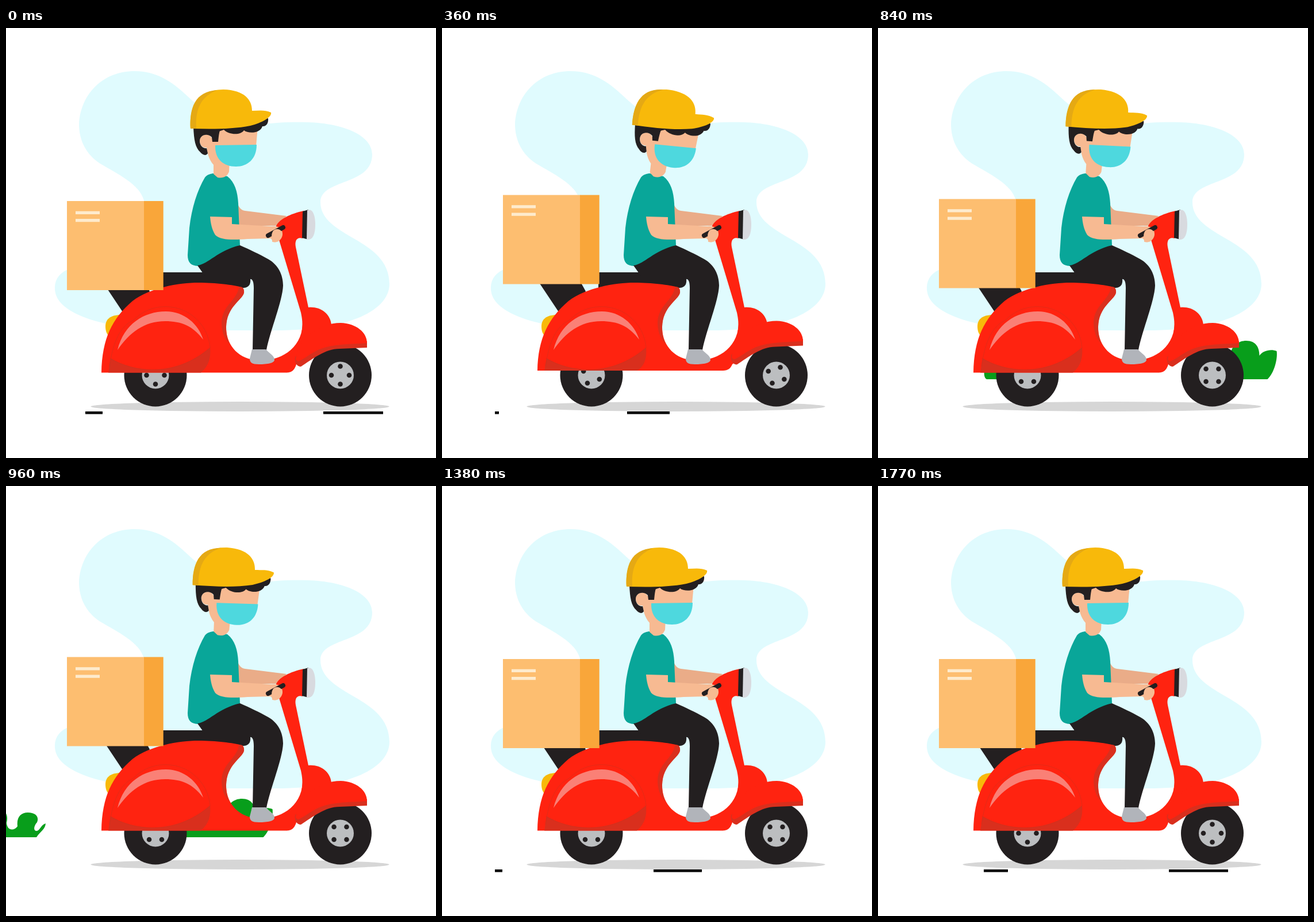
These frames come from a looping animation (748 px wide and 748 px high, 1.8 s). An HTML page with a canvas:

```html
<!DOCTYPE html>
<html lang="en">
<head>
<meta charset="utf-8">
<title>Scooter delivery</title>
<style>
html, body { margin: 0; width: 100%; height: 100%; overflow: hidden; background: #fff; }
canvas { display: block; width: 100vw; height: 100vh; }
</style>
</head>
<body>
<canvas id="stage" width="748" height="748"></canvas>
<script>
const ctx = document.getElementById('stage').getContext('2d');
const STEP = 30, STEPS = 60;

const INK = '#231f20', RED = '#ff2310', DARK_RED = '#d92f1d', SKIN = '#f7ba92',
  FAR_SKIN = '#eaac88', TEAL = '#09a699', YELLOW = '#f8b90a', GREY = '#bcbec0', GREEN = '#089e1b';

const shapes = {
  blob: 'M224 75C260 75 288 92 315 118C350 151 385 173 440 168C470 164 500 163 525 164C590 166 637 188 637 220C637 275 547 262 547 303C547 365 667 365 667 445C667 490 600 526 470 526H300C180 526 85 500 85 453C85 435 95 425 110 419C180 400 245 335 240 300C232 271 194 254 164 236C138 219 127 194 127 167C130 115 168 75 224 75Z',
  bigBush: 'M26 611C16 610 14 592 26 590C38 588 42 588 41 578C36 565 42 553 56 553C68 553 72 560 74 568C76 582 90 583 95 570C97 552 110 544 123 544C140 544 146 556 146 570C152 561 166 558 176 562C178 575 172 600 160 611Z',
  smallBush: 'M641 611C637 609 636 603 637 594C641 601 649 601 653 593C649 576 653 563 666 563C679 563 682 575 679 586C680 599 691 601 698 592C696 576 704 568 716 568C730 568 736 576 732 585C725 593 726 601 732 600C738 598 738 590 747 587C746 598 738 600 731 611Z',
  tail: 'M200 499C180 499 173 508 173 519C173 528 176 534 181 538L205 520Z',
  strut: 'M167 440H240L250 458L225 490L203 494Z',
  seat: 'M272 425H415C425 425 427 440 424 446C420 453 411 453 406 451L340 470H272Z',
  farArm: 'M403 306C406 313 409 317 416 318L488 327L473 344H404Z',
  head: 'M469 347C473 333 495 323 518 318L516 366C506 363 502 370 504 381L526 486C546 484 564 496 566 516L540 560L514 530C517 515 515 505 513 495L476 372Z',
  shadeHole: 'M405 451C411 449 415 454 414 461C411 473 384 485 383 520C383 532 385 542 389 550C378 538 375 525 375 512C376 482 402 474 405 451Z',
  glare: 'M194 560C205 515 240 493 278 493C310 493 335 515 343 542C325 518 305 510 277 510C240 510 215 530 194 560Z',
  seam: 'M180 588C186 550 196 520 222 508C250 478 300 477 330 505C347 521 353 538 355 556C300 604 230 603 182 575',
  fenderDark: 'M503 572C501 582 506 589 513 589C533 576 555 558 580 558L628 556V545L582 520Z',
  fender: 'M504 577C508 540 545 513 582 513C610 514 628 530 628 548C600 550 570 549 545 559C528 567 517 577 508 580Z',
  lampBand: 'M516 319L526 316V368L515 365Z',
  lamp: 'M524 317C533 313 538 325 538 342C538 360 533 370 523 368Z',
  shirt: 'M346 260C350 255 356 253 362 253L385 258C398 268 403 285 404 305L407 378C382 394 360 413 335 414C322 414 316 408 316 395L319 348C323 312 333 282 346 260Z',
  leg: 'M333 413C352 411 368 387 407 378C425 386 440 393 456 402C474 412 482 430 482 448C481 475 460 525 453 560H429L431 452C431 440 428 436 424 437H350Z',
  shoe: 'M428 559H452C458 566 467 570 467 577C467 583 455 585 440 585C428 585 424 582 424 575Z',
  nearArm: 'M355 328L393 329V341L462 345C475 343 482 350 481 360C479 370 471 374 465 372C462 370 463 367 460 366L420 367C395 369 372 369 364 360C358 350 356 340 355 328Z',
  fingers: 'M463 372C464 366 460 362 464 354C469 346 482 350 480 360C479 369 472 374 463 372Z',
  face: 'M337 196C337 185 352 182 357 190L362 196L370 176L438 172L435 205L412 230H389L388 250C385 258 378 262 368 260L361 254V238C352 228 350 215 349 208C342 209 337 204 337 196Z',
  hair: 'M326 173H374C370 182 370 190 369 198H359L358 190C350 182 336 186 337 198C338 207 345 210 349 209L351 218C348 223 342 221 338 216C329 208 327 194 326 173Z',
  fringe: 'M370 172L456 157C457 166 452 172 446 171C442 184 421 184 414 178C408 187 388 186 379 177L370 180Z',
  cap: 'M321 175C319 140 330 108 378 107C415 108 428 125 428 144C440 144 450 142 461 147C463 155 445 165 425 170C395 176 360 176 321 175Z',
  capShade: 'M321 175C319 140 328 110 368 108C340 118 329 140 331 175Z',
  mask: 'M364 204L436 203C436 228 420 241 400 241C378 241 363 228 364 204Z'
};
for (const name in shapes) shapes[name] = new Path2D(shapes[name]);

function fill(shape, color) {
  ctx.fillStyle = color;
  ctx.fill(typeof shape === 'string' ? shapes[shape] : shape);
}

function rect(x, y, w, h, color) {
  ctx.fillStyle = color;
  ctx.fillRect(x, y, w, h);
}

function disc(x, y, rx, color, ry = rx) {
  ctx.fillStyle = color;
  ctx.beginPath();
  ctx.ellipse(x, y, rx, ry, 0, 0, Math.PI * 2);
  ctx.fill();
}

function moved(dx, dy, draw) {
  ctx.save();
  ctx.translate(dx, dy);
  draw();
  ctx.restore();
}

// linear interpolation through [step, value] pairs
function keys(n, list) {
  for (let i = 1; i < list.length; i++) {
    const [a, u] = list[i - 1], [b, v] = list[i];
    if (n <= b) return u + (v - u) * (n - a) / (b - a);
  }
  return list[list.length - 1][1];
}

const DASH = [104, 103, 98, 92, 84, 74, 64, 53, 42, 30, 21, 13, 7, 4];

function dash(age) {
  if (age < 0 || age >= DASH.length) return;
  rect(Math.max(92, 552 - 46 * age), 667, DASH[age], 4.6, '#000');
}

function wheel(x, angle) {
  disc(x, 604, 54.5, INK);
  disc(x, 604, 23.5, GREY);
  for (let i = 0; i < 4; i++) {
    const a = angle + i * Math.PI / 2;
    disc(x + 15.5 * Math.cos(a), 604 + 15.5 * Math.sin(a), 4.3, INK);
  }
}

function scooterBody(rise) {
  const floor = 599.5 - rise;
  fill(new Path2D(`M166 ${floor}C167 540 185 505 220 475C250 452 300 443 335 443C365 443 395 447 411 451C416 456 415 464 405 473C386 489 383 505 383 525C385 553 405 577 440 578C480 580 518 555 516 508L560 520L530 565L505 585C501 ${floor - 1} 494 ${floor} 486 ${floor}Z`), RED);
  fill('shadeHole', DARK_RED);
  fill(new Path2D(`M182 575C230 603 300 604 355 556C357 578 350 590 339 ${floor}H178Z`), DARK_RED);
  ctx.strokeStyle = 'rgba(170,60,40,.45)';
  ctx.lineWidth = 0.8;
  ctx.stroke(shapes.seam);
  fill('glare', '#fa8076');
}

function rider(tilt) {
  fill('shirt', TEAL);
  fill('leg', INK);
  fill('shoe', '#b1b4ba');
  ctx.save();
  ctx.translate(383, 258);
  ctx.rotate(tilt);
  ctx.translate(-383, -258);
  fill('face', SKIN);
  fill('hair', INK);
  fill('fringe', INK);
  fill('cap', YELLOW);
  fill('capShade', '#e5a914');
  fill('mask', '#4ed8de');
  ctx.restore();
}

function grip() {
  ctx.strokeStyle = INK;
  ctx.lineWidth = 8;
  ctx.lineCap = 'round';
  ctx.beginPath();
  ctx.moveTo(456, 361);
  ctx.lineTo(482, 347);
  ctx.stroke();
}

function parcel() {
  rect(106, 301, 134.5, 155, '#fdbe70');
  rect(240, 301, 33.7, 155, '#f9a63a');
  rect(121, 318.7, 42, 5.3, '#feebcd');
  rect(121, 332, 42, 5.3, '#feebcd');
}

function render(n) {
  const beat = (n - 3) % 6;
  const lift = n > 3 && n < 45 ? 3.5 * (3 - Math.abs(3 - beat)) : 0;
  const rise = Math.max(0, lift - 7);
  const tilt = keys(n, [[0, 0], [12, 1], [18, 1], [41, 0], [60, 0]]) * 0.1135;
  const spin = (45 * n + Math.min(45, 2.25 * n)) * Math.PI / 180;

  rect(0, 0, 748, 748, '#fff');
  fill('blob', '#e0fbfe');
  disc(407, 658.5, 259.5, '#d6d6d6', 8.5);

  // two staggered road dashes, with a pause in the middle
  if (n < 16) dash(n);
  if (n < 21) dash((n + 9) % 16);
  if (n >= 35) dash((n - 35) % 16);
  if (n >= 42) dash((n - 42) % 16);

  moved(-56.5 * (n - 20), 0, () => fill('smallBush', GREEN));
  moved(-57.5 * (n - 37), 0, () => fill('bigBush', GREEN));

  wheel(260, spin);
  wheel(581.5, spin);
  fill('tail', YELLOW);
  fill('strut', INK);
  fill('farArm', FAR_SKIN);
  fill('seat', INK);
  scooterBody(rise);
  fill('head', RED);
  moved(0, -rise, () => {
    fill('fenderDark', DARK_RED);
    fill('fender', RED);
  });
  fill('lampBand', INK);
  fill('lamp', '#d8dadf');
  rider(tilt);
  fill('nearArm', SKIN);
  grip();
  fill('fingers', SKIN);
  moved(0, -lift, parcel);
}

const start = performance.now();
function tick() {
  render(Math.floor((performance.now() - start) / STEP) % STEPS);
  requestAnimationFrame(tick);
}
tick();
</script>
</body>
</html>
```
